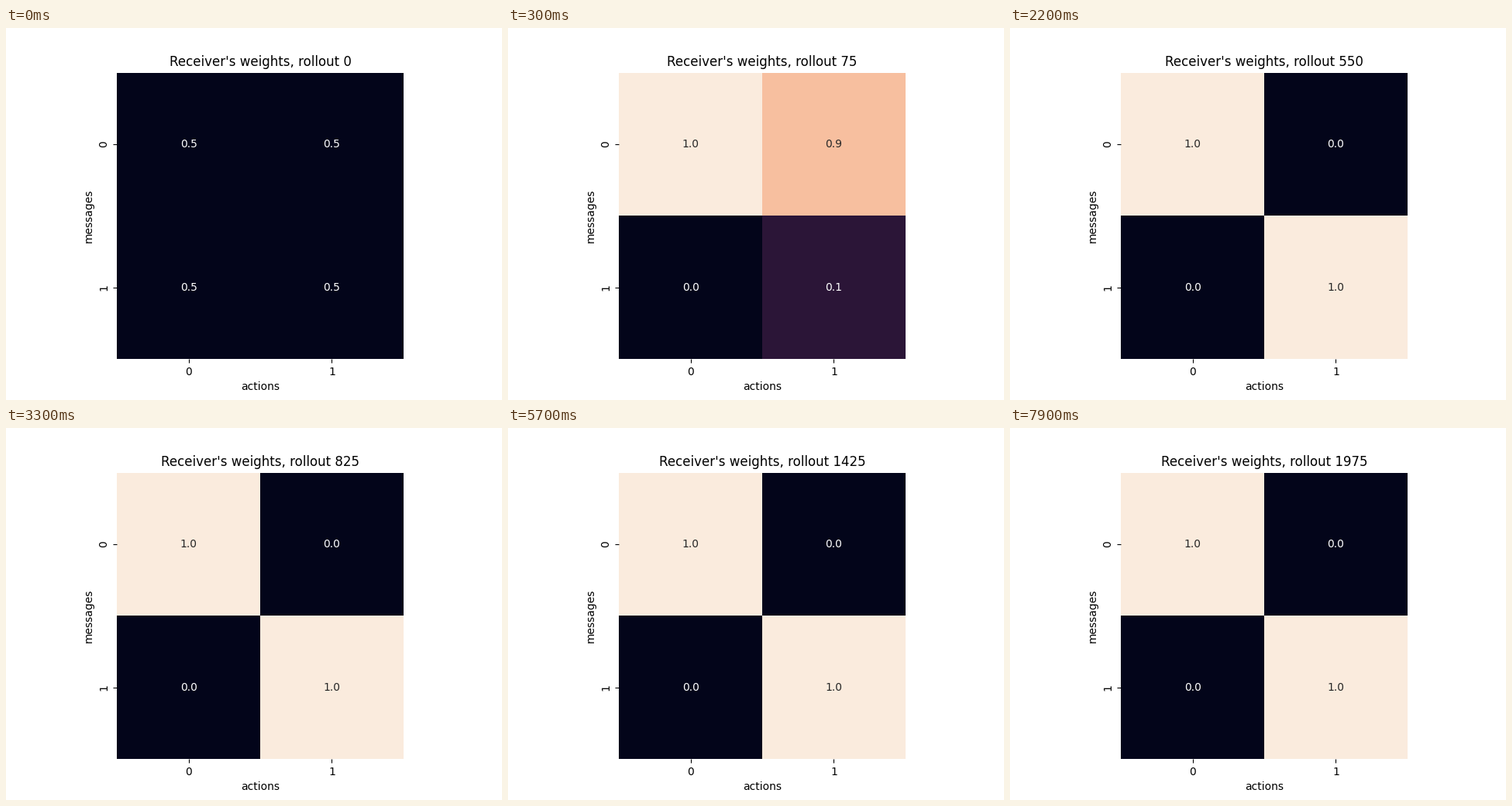
A matplotlib script for the animation above (8000 ms loop, 640 px wide and 480 px high).

```python
import numpy as np
import matplotlib.pyplot as plt
from matplotlib.animation import FuncAnimation
from matplotlib.colors import LinearSegmentedColormap

FRAMES = 80
INTERVAL = 100
ROLLOUTS_PER_FRAME = 25

ROCKET = LinearSegmentedColormap.from_list("rocket", [
    "#03051a", "#35193e", "#701f57", "#ad1759",
    "#e13342", "#f37651", "#f6b48f", "#faebdd"])

# Logits of message 0 for each action, sampled along the rollouts.
LOGIT_ROLLOUTS = [0, 25, 50, 75, 100, 125, 150, 200, 225]
LOGITS_0 = [0, 1.6, 3.6, 5.8, 7, 8, 9, 10, 11]
LOGITS_1 = [0, 0.9, 1.7, 2.0, 1.2, -0.5, -2.5, -6.0, -8.0]


def weights(rollout):
    logits = np.array([np.interp(rollout, LOGIT_ROLLOUTS, row)
                       for row in (LOGITS_0, LOGITS_1)])
    p = 1 / (1 + np.exp(-logits))
    return np.array([p, 1 - p])


def luminance(rgba):
    rgb = np.asarray(rgba)[:3]
    linear = np.where(rgb <= 0.03928, rgb / 12.92,
                      ((rgb + 0.055) / 1.055) ** 2.4)
    return linear @ [0.2126, 0.7152, 0.0722]


fig, ax = plt.subplots(figsize=(6.4, 4.8), dpi=100)
mesh = ax.pcolormesh(weights(0), cmap=ROCKET)
ax.set(xlim=(0, 2), ylim=(2, 0), aspect="equal",
       xlabel="actions", ylabel="messages")
ax.set_xticks([0.5, 1.5], ["0", "1"])
ax.set_yticks([0.5, 1.5], ["0", "1"], rotation="vertical", va="center")
for spine in ax.spines.values():
    spine.set_visible(False)

title = ax.set_title("")
labels = [ax.text(col + 0.5, row + 0.5, "", ha="center", va="center")
          for row in range(2) for col in range(2)]


def update(i):
    rollout = i * ROLLOUTS_PER_FRAME
    values = weights(rollout)
    mesh.set_array(values)
    mesh.set_clim(values.min(), values.max())
    for label, value in zip(labels, values.flat):
        light = luminance(mesh.to_rgba(value)) > 0.408
        label.set_text(f"{value:.1f}")
        label.set_color("0.15" if light else "white")
    title.set_text(f"Receiver's weights, rollout {rollout}")
    return [mesh, title, *labels]


anim = FuncAnimation(fig, update, frames=FRAMES, interval=INTERVAL,
                     repeat=True, repeat_delay=0)
plt.show()
```
